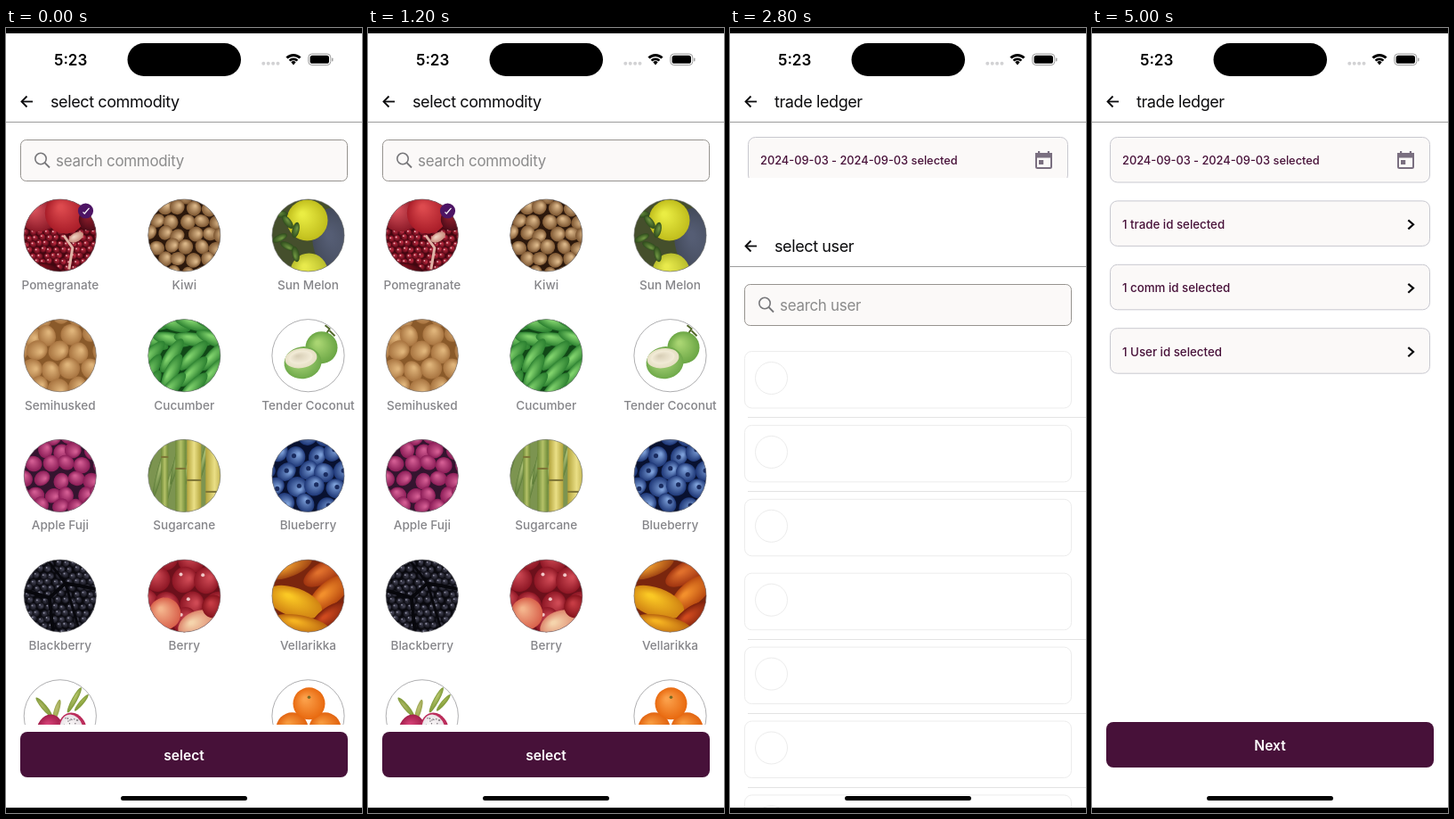
An HTML page with a canvas that plays this animation: 400 by 880 pixels, repeating every 5100 ms.

```html
<!DOCTYPE html>
<html lang="en">
<head>
<meta charset="utf-8">
<title>Trade ledger</title>
<style>
html, body { margin: 0; width: 100%; height: 100%; overflow: hidden; background: #fff; }
canvas { display: block; width: 400px; height: 880px; }
</style>
</head>
<body>
<canvas id="stage"></canvas>
<script>
const W = 400, H = 880, LOOP = 5100, STEP = 100, TRAVEL = 874;
const canvas = document.getElementById('stage');
const dpr = window.devicePixelRatio || 1;
canvas.width = W * dpr;
canvas.height = H * dpr;
const c = canvas.getContext('2d');

const PLUM = '#471139', INK = '#0b0b0d', FIELD = '#fbf9f8';

// ---------- helpers ----------
function text(s, x, y, size, color, weight = 400, align = 'left', spacing = 0) {
  c.font = `${weight} ${size}px Inter, "Liberation Sans", sans-serif`;
  c.letterSpacing = spacing + 'px';
  c.textAlign = align;
  c.fillStyle = color;
  c.fillText(s, x, y);
}

function box(x, y, w, h, r, fill, stroke, lw = 1) {
  c.beginPath();
  c.roundRect(x, y, w, h, r);
  if (fill) { c.fillStyle = fill; c.fill(); }
  if (stroke) { c.strokeStyle = stroke; c.lineWidth = lw; c.stroke(); }
}

function rect(x, y, w, h, color) {
  c.fillStyle = color;
  c.fillRect(x, y, w, h);
}

function path(points, color, lw) {
  c.beginPath();
  for (let i = 0; i < points.length; i += 2) c.lineTo(points[i], points[i + 1]);
  c.strokeStyle = color;
  c.lineWidth = lw;
  c.stroke();
}

function disc(x, y, r, fill, stroke, lw = 1) {
  c.beginPath();
  c.arc(x, y, r, 0, Math.PI * 2);
  if (fill) { c.fillStyle = fill; c.fill(); }
  if (stroke) { c.strokeStyle = stroke; c.lineWidth = lw; c.stroke(); }
}

function oval(x, y, rx, ry, angle, light, dark) {
  c.save();
  c.translate(x, y);
  c.rotate(angle);
  c.scale(rx, ry);
  const g = c.createRadialGradient(-0.25, -0.3, 0.1, 0, 0, 1);
  g.addColorStop(0, light);
  g.addColorStop(1, dark || light);
  disc(0, 0, 1, g);
  c.restore();
}

const ball = (x, y, r, light, dark) => oval(x, y, r, r, 0, light, dark);
const ground = color => rect(-42, -42, 84, 84, color);

function random(seed) {
  return () => (seed = (seed * 16807) % 2147483647) / 2147483647;
}

// Staggered heap of round fruit; extra() adds a detail to each one.
function heap(bg, light, dark, r, seed, extra) {
  const rnd = random(seed), gap = r * 1.9;
  ground(bg);
  for (let y = -44, row = 0; y < 50; y += gap * 0.88, row++) {
    for (let x = -46 + (row % 2) * gap / 2; x < 50; x += gap) {
      const px = x + (rnd() - 0.5) * r * 0.6, py = y + (rnd() - 0.5) * r * 0.6;
      oval(px, py, r, r * (0.8 + rnd() * 0.2), rnd() * 3, light, dark);
      if (extra) extra(px, py, rnd);
    }
  }
}

// ---------- produce ----------
const produce = {
  Pomegranate() {
    heap('#43060f', '#bd2a40', '#5e0a18', 4, 71, (x, y) => disc(x - 1, y - 1, 0.9, '#f0b4ba'));
    ball(-25, -24, 20, '#d9525c', '#8c1a28');
    ball(6, -25, 23, '#dd4a4e', '#a81c28');
    ball(34, -18, 13, '#8e1d2b', '#4e0b18');
    oval(18, 2, 9, 5, -0.5, '#efd2c2', '#c98a7c');
    path([4, 0, 14, 14, 10, 38], '#e0b3a6', 3);
    oval(-16, 37, 17, 6, 0.2, '#7c0d1c', '#3b0710');
  },
  Kiwi() {
    heap('#2c180c', '#dab688', '#7d5631', 8.5, 23);
  },
  'Sun Melon'() {
    ground('#454f2c');
    oval(34, 10, 28, 42, -0.3, '#555d74', '#434a5a');
    ball(-1, -17, 23, '#eaed43', '#c0bd1c');
    ball(1, 41, 21, '#e8ea4c', '#b9bd2c');
    for (let i = 0; i < 6; i++)
      oval(-32 + (i % 3) * 9, -24 + i * 9, 9, 4, i * 0.9, '#6d9440', '#2d4a1b');
  },
  Semihusked() {
    heap('#8a5a2a', '#dfb47a', '#a87440', 12, 45);
  },
  Cucumber() {
    ground('#114817');
    const rnd = random(88);
    for (let i = 0; i < 20; i++) {
      const x = -38 + (i % 4) * 24, y = -36 + Math.floor(i / 4) * 18;
      const a = y < -10 ? 0.1 + rnd() * 0.4 : -1.1 + rnd() * 0.4;
      oval(x, y, 22, 7.5, a, '#80d26c', '#2b8030');
    }
  },
  'Tender Coconut'() {
    ground('#fff');
    path([16, -18, 24, -30, 19, -34], '#53682b', 2);
    path([24, -28, 30, -22], '#53682b', 2);
    ball(15, -9, 18, '#a9d572', '#6aa544');
    oval(-6, 8, 21, 18, -0.15, '#b2da80', '#6fa94a');
    oval(-8, 3, 18, 11, -0.15, '#fbf6e6', '#e6dfc4');
    oval(-8, 2, 13, 7, -0.15, '#d9d0b8', '#f3ecd8');
  },
  'Apple Fuji'() {
    heap('#34142f', '#d25c92', '#8a1c56', 9.5, 19);
  },
  Sugarcane() {
    ground('#7c9450');
    for (let i = 0; i < 9; i++) oval(-38 + i * 10, -20 + (i * 17) % 50, 3, 30, 0.25, '#a9bd74', '#5a7a36');
    [-26, -10, 3, 24].forEach((x, i) => {
      const w = 8 + i * 4, edge = i < 2 ? '#6e8a38' : '#b3a43c';
      const g = c.createLinearGradient(x, 0, x + w, 0);
      g.addColorStop(0, edge);
      g.addColorStop(0.5, i < 2 ? '#b5c268' : '#eadf86');
      g.addColorStop(1, edge);
      rect(x, -42, w, 84, g);
      rect(x, -22 + i * 13, w, 2, '#7d7436');
    });
  },
  Blueberry() {
    heap('#081130', '#7c9fd8', '#1d3676', 11.5, 37, (x, y, rnd) => {
      disc(x + rnd() * 6 - 3, y + rnd() * 6 - 3, 2.6, '#1a2c60');
    });
  },
  Blackberry() {
    heap('#08080d', '#454556', '#101018', 4.2, 53, (x, y) => disc(x - 1, y - 1.2, 0.9, '#8e8ea2'));
    path([-40, -6, -12, 2, 6, -14, 40, -8], '#07070c', 4);
    path([-12, 2, -8, 40], '#07070c', 4);
    path([-14, -40, 6, -14, 22, 40], '#07070c', 3);
  },
  Berry() {
    heap('#6c101b', '#cf4a55', '#8d1624', 15, 62, (x, y) => disc(x - 4, y - 6, 2, '#f1c8c8'));
    ball(-22, 20, 18, '#f4b48c', '#d8604a');
    oval(15, 32, 23, 15, -0.4, '#f5d4ac', '#dc846a');
    ball(33, 12, 13, '#c63c44', '#84121c');
  },
  Vellarikka() {
    ground('#7a260e');
    oval(-20, -32, 26, 10, -0.4, '#ee9c2e', '#a04512');
    oval(20, -27, 28, 12, -0.5, '#e0702c', '#a03410');
    oval(24, -3, 28, 13, -0.7, '#f28f2c', '#b8480f');
    oval(-16, 7, 33, 16, 0.35, '#fac824', '#d08212');
    oval(25, 23, 25, 11, -0.6, '#cf4a1e', '#7c200c');
    oval(-8, 33, 33, 11, 0.2, '#f5b322', '#b8620e');
  },
  Dragonfruit() {
    ground('#fff');
    oval(-18, -10, 3, 14, -0.7, '#a9b45e', '#7d9838');
    oval(-4, -6, 3, 13, 0.3, '#b9be70', '#98a34c');
    oval(16, -18, 3, 16, 0.5, '#b4c468', '#7d9838');
    oval(24, -15, 2.5, 12, 0.7, '#a0b44e', '#7d9838');
    oval(-12, 18, 15, 20, 0.2, '#d8447a', '#a31f4c');
    oval(14, 16, 16, 20, -0.2, '#d44474', '#b82a58');
    oval(13, 16, 13, 18, -0.2, '#fbf8f8', '#e9e2e6');
    const rnd = random(14);
    for (let i = 0; i < 40; i++) disc(4 + rnd() * 18, 2 + rnd() * 24, 0.7, '#6c666c');
  },
  Orange() {
    ground('#fff');
    ball(-18, 14, 18, '#f79a3e', '#e26410');
    ball(19, 14, 18, '#f79a3e', '#e26410');
    ball(1, -14, 18, '#fba04a', '#e8690f');
    disc(1, -21, 1.8, '#7a6a24');
  }
};

const names = Object.keys(produce);
names.splice(13, 0, null);

function fruit(name, x, y) {
  c.save();
  c.translate(x, y);
  c.save();
  c.beginPath();
  c.arc(0, 0, 40.6, 0, Math.PI * 2);
  c.clip();
  produce[name]();
  c.restore();
  disc(0, 0, 40.6, null, '#77777b', 0.6);
  c.restore();
  text(name, x, y + 60.5, 13.6, '#858589', 500, 'center');
}

// ---------- screens ----------
function header(title) {
  path([30, 82.5, 18, 82.5], INK, 1.8);
  path([23.5, 76.5, 17.5, 82.5, 23.5, 88.5], INK, 1.8);
  text(title, 50, 89, 18, INK, 400, 'left', -0.4);
  rect(0, 105, W, 1, '#9c9c9c');
}

function search(hint) {
  box(16.5, 125.5, 367, 46, 6, FIELD, '#96938f', 1);
  disc(39, 146.5, 6.2, null, '#77777a', 1.6);
  path([43.5, 151, 49, 156.5], '#77777a', 1.8);
  text(hint, 56, 154.5, 16.9, '#8b8b8b', 400, 'left', -0.26);
}

function button(label, y) {
  box(16, y, 368, 51, 8, PLUM);
  text(label, 200, y + 31.5, 15.6, '#fff', 600, 'center');
}

function clipList(draw) {
  c.save();
  c.beginPath();
  c.rect(0, 106, W, 675);
  c.clip();
  draw();
  c.restore();
}

function commodities() {
  header('select commodity');
  search('search commodity');
  clipList(() => {
    names.forEach((name, i) => {
      if (name) fruit(name, [60.8, 200.3, 339.5][i % 3], 232.5 + Math.floor(i / 3) * 134.7);
    });
    disc(89.5, 205, 8.6, '#4d1464');
    path([86.5, 206.3, 88.2, 208, 93.5, 201.8], '#fff', 1.2);
  });
  button('select', 789);
}

const users = [
  ['Nivesh B', '5550182678'], ['Varun Melkadi', '5550187848'],
  ['Nivesh kolandhiya', '5550174790'], ['ARUV', '5550165544'],
  ['Nivesh Test User', '5550178877'], ['Bhuvi', '5550177666'],
  ['Dev', '5550188777'], ['EFGH', '5550156532'],
  ['Shri MADHUL  KESPAN', '5550184964']
];

// Row rules are thinner than a pixel, so they show only near a pixel row.
function hairline(y, offset) {
  const at = y + offset, snap = Math.round(at - 0.1);
  if (Math.abs(at - 0.1 - snap) <= 0.22) rect(20, snap - Math.round(offset), 380, 1, '#e1e1e3');
}

function userRows(offset, checked) {
  users.forEach(([name, phone], i) => {
    const y = 215 + i * 64.55;
    text(name, 16, y + 4.6, 13.1, '#262027');
    text(phone, 16, y + 26.3, 11, '#7f7f86', 500);
    const on = checked && i === 0;
    box(360.7, y - 4.8, 22, 22.4, 1.5, '#fff', on ? '#431343' : '#6f1c66', 3);
    if (on) path([365, y + 6, 369.8, y + 11, 379, y + 1.5], '#431343', 3);
    hairline(256.05 + i * 64.55, offset);
  });
}

function skeleton() {
  for (let i = 0; i < 8; i++) {
    const y = 200.5 + i * 82.9;
    box(16.5, y, 367, 63.5, 8, '#fff', '#ececec', 1);
    disc(46.5, y + 30, 18, null, '#ececec', 1);
    if (i !== 2) rect(20, Math.round(y + 73.5), 380, 1, '#e3e3e3');
  }
}

function userScreen(t, offset) {
  header('select user');
  search('search user');
  clipList(() => t < 3200 ? skeleton() : userRows(offset, t >= 3900));
  button('select', 789);
}

function calendar(x, y) {
  const color = '#7a6f80';
  box(x + 1, y + 3, 17, 16, 1.5, null, color, 2);
  rect(x, y + 2, 19, 5.5, color);
  rect(x + 3, y, 2.2, 3, color);
  rect(x + 13.8, y, 2.2, 3, color);
  rect(x + 4, y + 10, 5.2, 5, color);
}

function ledger(t) {
  header('trade ledger');
  const rows = ['2024-09-03 - 2024-09-03 selected', '1 trade id selected', '1 comm id selected',
    t < 4700 ? 'select user' : '1 User id selected'];
  rows.forEach((label, i) => {
    const y = 122.5 + i * 71.4;
    box(20.5, y, 359, 50.5, 8, FIELD, '#c8c8cf', 1);
    text(label, 34, y + 30.8, i ? 13.3 : 12.8, PLUM, 500);
    if (i) path([355.3, y + 21.5, 361, y + 26.3, 355.3, y + 31.5], INK, 2.2);
    else calendar(343, 138);
  });
  button('Next', 778);
}

function statusBar(barColor) {
  rect(0, 0, W, 6, '#000');
  rect(0, 874, W, 6, '#000');
  box(136.5, 17, 127.5, 37, 18.5, '#000');
  text('5:23', 72.6, 41.5, 17, '#000', 600, 'center');
  for (let i = 0; i < 4; i++) disc(289.3 + i * 5.4, 39.8, 2, '#d2d2d4');
  [[10.6, 3], [6.2, 2.8]].forEach(([r, lw]) => {
    c.beginPath();
    c.arc(323, 41, r, -Math.PI * 0.75, -Math.PI * 0.25);
    c.strokeStyle = '#000';
    c.lineWidth = lw;
    c.stroke();
  });
  c.beginPath();
  c.moveTo(323, 41.6);
  c.arc(323, 41, 3.8, -Math.PI * 0.75, -Math.PI * 0.25);
  c.fillStyle = '#000';
  c.fill();
  box(339.8, 29, 25, 12.6, 4, null, '#9a9a9a', 1);
  box(341.6, 30.8, 21.4, 9, 2.6, '#000');
  box(366, 33.5, 1.5, 4, 0.8, '#a5a5a5');
  box(129, 861, 142, 5, 2.5, barColor);
}

// ---------- motion ----------
// Critically damped spring, 0 to 1.
function spring(ms) {
  if (ms <= 0) return 0;
  const x = ms * 0.018;
  return 1 - (1 + x) * Math.exp(-x);
}

function sheet(offset, draw) {
  c.save();
  c.translate(0, Math.round(offset));
  rect(0, 6, W, H, '#fff');
  draw();
  c.restore();
}

function render(t) {
  c.setTransform(dpr, 0, 0, dpr, 0, 0);
  rect(0, 0, W, H, '#fff');
  ledger(t);
  const first = t < 2600;
  const offset = TRAVEL * (first ? spring(t - 1564.7)
    : t < 4600 ? 1 - spring(t - 2628) : spring(t - 4682.1));
  if (offset < TRAVEL - 1)
    sheet(offset, () => first ? commodities() : userScreen(t, offset));
  const overButton = offset > 23 && offset < 74;
  statusBar(overButton ? '#544b52' : '#000');
}

let last = -1;
const start = performance.now();
function tick() {
  const t = Math.floor(((performance.now() - start) % LOOP) / STEP) * STEP;
  if (t !== last) render(last = t);
  requestAnimationFrame(tick);
}
tick();
</script>
</body>
</html>
```
